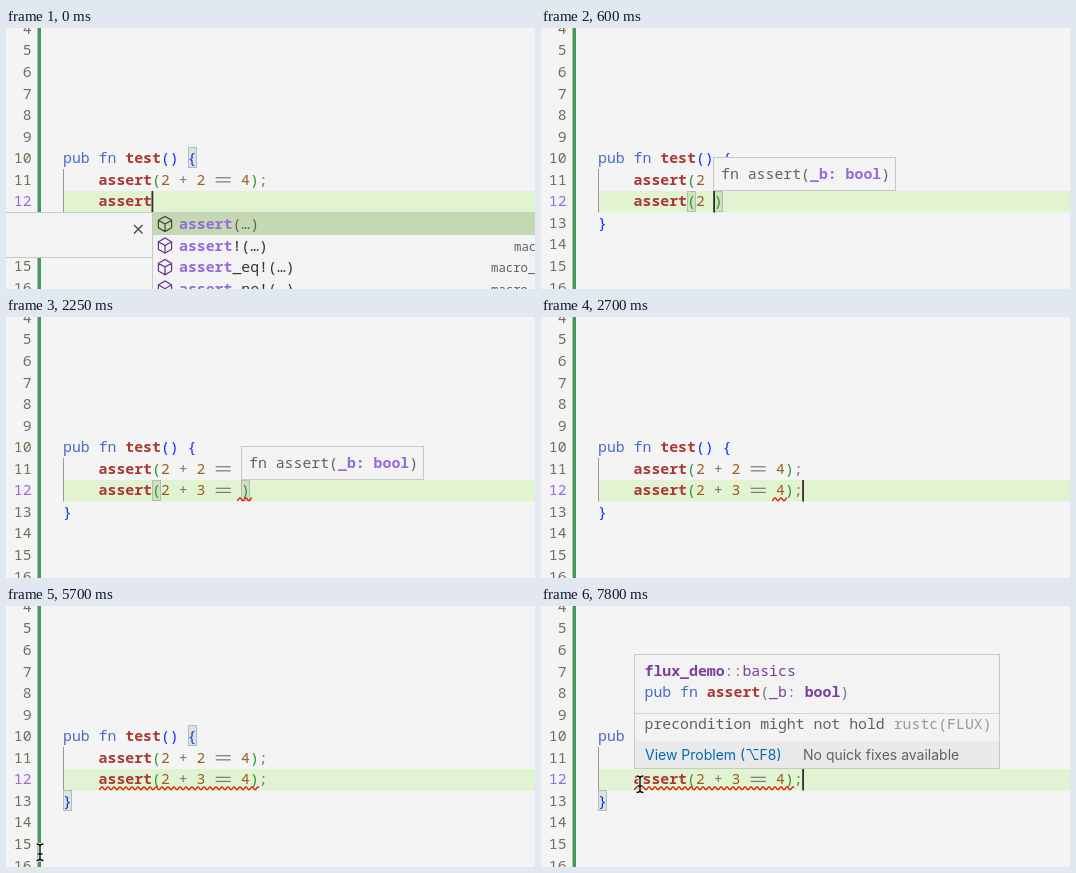
Animation, 529 px wide and 261 px high, one loop 8 s. Source, as an HTML page with a canvas:

```html
<!DOCTYPE html>
<html lang="en">
<head>
<meta charset="utf-8">
<title>Code editor</title>
<style>
html, body { margin: 0; width: 100%; height: 100%; overflow: hidden; background: #f4f4f4; }
canvas { display: block; width: 529px; height: 261px; }
</style>
</head>
<body>
<canvas id="stage"></canvas>
<script>
const W = 529, H = 261, LOOP = 8000, TICK = 150;
const CHAR = 8.9, LEFT = 57, ROW = 21.55;
const MONO = '"Noto Sans Mono", "DejaVu Sans Mono", monospace';
const SANS = 'Inter, "DejaVu Sans", sans-serif';
const C = {
  bg: '#f4f4f4', widget: '#f3f3f3', border: '#c8c8c8', line: '#e2f3d2',
  num: '#6d705b', accent: '#9769dc', key: '#4b69c6', fn: '#aa3731',
  digit: '#9c5d27', punct: '#777777', outer: '#0431fa', inner: '#319331',
  type: '#7a3e9d', text: '#616161', dark: '#333333', error: '#e51400'
};

const canvas = document.getElementById('stage');
const ctx = canvas.getContext('2d');
const dpr = window.devicePixelRatio || 1;
canvas.width = W * dpr;
canvas.height = H * dpr;

// [time, text typed after "assert(", column of the signature hint]
const typing = [
  [150, '', 0], [300, '', 11], [450, '2', 12], [600, '2 ', 13],
  [750, '2 +', 14], [900, '2 + ', 15], [1050, '2 + 3', 16],
  [1200, '2 + 3 ', 16], [1350, '2 + 3 ', 17], [1500, '2 + 3 =', 18],
  [1650, '2 + 3 ==', 19], [1800, '2 + 3 == ', 20], [2400, '2 + 3 == 4', 21],
  [2550, '2 + 3 == 4)', 0], [2700, '2 + 3 == 4);', 0]
];
const blinks = [2250, 2400, 3300, 3900, 4350, 4800, 5400, 5850, 6450, 6900, 7350, 7800];
const mousePath = [[34, 246], [58, 196], [84, 152], [97, 136], [100, 150], [99, 168], [99, 176], [99, 178]];

const colX = col => LEFT + col * CHAR;
const midY = line => 173.3 + (line - 12) * ROW;

function rect(x, y, w, h, fill, stroke) {
  ctx.fillStyle = fill;
  ctx.fillRect(x, y, w, h);
  if (!stroke) return;
  ctx.strokeStyle = stroke;
  ctx.lineWidth = 1;
  ctx.strokeRect(x + 0.5, y + 0.5, w - 1, h - 1);
}

function text(str, x, y, color, bold, font = MONO, size = 14.83) {
  ctx.font = `${bold ? 'bold ' : ''}${size}px ${font}`;
  ctx.fillStyle = color;
  ctx.fillText(str, x, y + 5);
}

// Draws [string, color, bold] parts one after another on the character grid.
function spans(x, y, parts) {
  for (const [str, color, bold] of parts) {
    text(str, x, y, color, bold);
    x += str.length * CHAR;
  }
}

function tokenColor(token, paren) {
  if (/^(pub|fn)$/.test(token)) return C.key;
  if (/^[a-z]/.test(token)) return C.fn;
  if (/\d/.test(token)) return C.digit;
  if (/[{}]/.test(token)) return C.outer;
  if (/[()]/.test(token)) return paren;
  return C.punct;
}

function code(line, str, paren = C.inner) {
  const y = midY(line);
  for (const m of str.matchAll(/[a-z]+|\d|==|\S/g)) {
    const x = colX(m.index), color = tokenColor(m[0], paren);
    if (m[0] === '==') {
      rect(x + 1.4, y - 2.6, 15, 1.2, color);
      rect(x + 1.4, y + 1.5, 15, 1.2, color);
    } else {
      text(m[0], x, y, color, color === C.fn);
    }
  }
}

function bracketBox(line, col) {
  rect(Math.round(colX(col)), Math.round(midY(line) - ROW / 2), 9, 21, 'rgba(0,100,0,0.1)', '#b9b9b9');
}

function squiggle(x0, x1) {
  ctx.beginPath();
  for (let x = x0; x <= x1; x += 0.5) {
    ctx.lineTo(x, 182.3 + 1.4 * Math.cos((x - x0) * Math.PI / 3));
  }
  ctx.strokeStyle = C.error;
  ctx.lineWidth = 1.3;
  ctx.stroke();
}

function cube(x, y, color) {
  ctx.beginPath();
  for (let i = 0; i <= 6; i++) {
    const a = Math.PI / 6 + i * Math.PI / 3;
    ctx.lineTo(x + 7.6 * Math.cos(a), y + 7.6 * Math.sin(a));
  }
  ctx.moveTo(x - 6.6, y - 3.8);
  ctx.lineTo(x, y);
  ctx.lineTo(x + 6.6, y - 3.8);
  ctx.moveTo(x, y);
  ctx.lineTo(x, y + 7.6);
  ctx.strokeStyle = color;
  ctx.lineWidth = 1.2;
  ctx.stroke();
}

function suggestions() {
  rect(-1, 184, 149, 46, C.widget, C.border);
  ctx.beginPath();
  ctx.moveTo(128, 197); ctx.lineTo(136.5, 205.5);
  ctx.moveTo(136.5, 197); ctx.lineTo(128, 205.5);
  ctx.strokeStyle = '#424242';
  ctx.lineWidth = 1.2;
  ctx.stroke();

  rect(146, 184, 400, 100, C.widget, C.border);
  rect(147, 185, 390, 22, '#c4d9b1');
  const rows = [['', '(…)', 0], ['', '!(…)', 508], ['_eq', '!(…)', 485], ['_ne', '!(…)', 485]];
  rows.forEach(([suffix, tail, kindX], i) => {
    const y = 196 + i * ROW;
    cube(159, y, i ? '#652d90' : '#424242');
    spans(173, y, [['assert', C.accent, true], [suffix + tail, i ? C.dark : C.text]]);
    if (kindX) text('macro_rules', kindX, y, C.text, false, MONO, 12.3);
  });
}

function signature(col) {
  const x = Math.floor(colX(col));
  rect(x, 129, 183, 34, C.widget, C.border);
  spans(x + 8, 146, [['fn assert(', C.text], ['_b: bool', C.accent, true], [')', C.text]]);
}

function hover() {
  rect(93, 48, 366, 115, C.widget, C.border);
  rect(94, 135, 364, 27, '#e9e9e9');
  rect(94, 107, 364, 1, '#d4d4d4');
  spans(103.5, 64.5, [['flux_demo', C.type, true], ['::', C.punct], ['basics', C.type]]);
  spans(103.5, 86, [
    ['pub fn ', C.key], ['assert', C.fn, true], ['(', C.punct], ['_b', C.type],
    [': ', C.punct], ['bool', C.type, true], [')', C.punct]
  ]);
  spans(103.5, 118, [['precondition might not hold ', C.text], ['rustc(FLUX)', '#999999']]);
  text('View Problem (⌥F8)', 104, 149, '#006ab1', false, SANS, 14);
  text('No quick fixes available', 262, 149, C.text, false, SANS, 14);
}

function mouse([x, y]) {
  ctx.beginPath();
  ctx.moveTo(x - 3.5, y - 8);
  ctx.quadraticCurveTo(x, y - 8, x, y - 5.5);
  ctx.quadraticCurveTo(x, y - 8, x + 3.5, y - 8);
  ctx.moveTo(x, y - 6);
  ctx.lineTo(x, y + 6);
  ctx.moveTo(x - 3.5, y + 8.5);
  ctx.quadraticCurveTo(x, y + 8.5, x, y + 6);
  ctx.quadraticCurveTo(x, y + 8.5, x + 3.5, y + 8.5);
  ctx.moveTo(x - 2.5, y + 2);
  ctx.lineTo(x + 2.5, y + 2);
  for (const [color, width] of [['#ffffff', 3.2], ['#111111', 1.4]]) {
    ctx.strokeStyle = color;
    ctx.lineWidth = width;
    ctx.stroke();
  }
}

function draw(t) {
  const step = typing.filter(s => s[0] <= t).pop();
  const typed = step ? step[1] : '';
  const closed = typed.includes(')');
  const cursorCol = step ? 11 + typed.length : 10;

  ctx.setTransform(dpr, 0, 0, dpr, 0, 0);
  rect(0, 0, W, H, C.bg);
  rect(LEFT, 163, W - LEFT, 21.5, C.line);
  rect(31.5, 0, 3.5, H, '#48985d');
  for (let n = 4; n <= 16; n++) {
    text(String(n), 25.6 - CHAR * String(n).length, midY(n), n === 12 ? C.accent : C.num);
  }
  rect(LEFT, 141, 1, 43.5, '#999999');

  if (!step || t >= 2850) {
    bracketBox(10, 14);
    bracketBox(13, 0);
  } else if (!typed.endsWith(';')) {
    bracketBox(12, 10);
    bracketBox(12, closed ? 20 + 1 : cursorCol);
  }
  code(10, 'pub fn test() {', C.outer);
  code(11, '    assert(2 + 2 == 4);');
  code(12, '    assert' + (step ? '(' + typed + (closed ? '' : ')') : ''));
  code(13, '}');

  if (t >= 2250 && t < 2850) squiggle(231, 246);
  if (t >= 4200) squiggle(93, 253);
  if (blinks.filter(b => b <= t).length % 2 === 0) {
    rect(colX(cursorCol) - 0.5, 163, 1.8, 21.5, '#332b2d');
  }

  if (!step) suggestions();
  else if (step[2]) signature(step[2]);
  if (t >= 7050) hover();
  if (t >= 5700) mouse(mousePath[Math.min(Math.floor((t - 5700) / TICK), mousePath.length - 1)]);
}

const start = performance.now();
function frame() {
  draw((performance.now() - start) % LOOP);
  requestAnimationFrame(frame);
}
frame();
</script>
</body>
</html>
```
